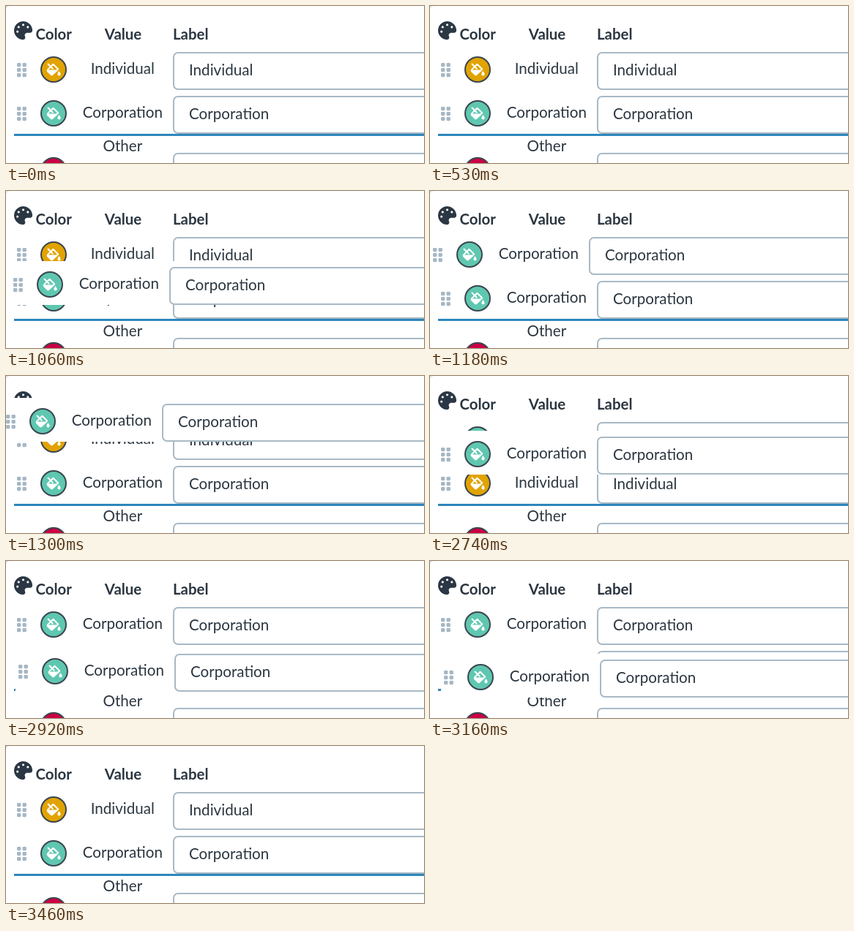
Recreate the animation shown at these times as an HTML page. Size 571x215 px, loop 4460 ms.

```html
<!DOCTYPE html>
<html lang="en">
<head>
<meta charset="utf-8">
<title>Sortable options</title>
<style>
  html, body { margin: 0; width: 100%; height: 100%; overflow: hidden; background: #fff; }
  svg { display: block; width: 571px; height: 215px; }
  text { font: 20.6px Lato, Carlito, sans-serif; fill: #2b3640; }
  .head text { font-weight: 700; font-size: 20.4px; }
  .mid { text-anchor: middle; }
  .grip { fill: #a6b7c4; }
  .box { fill: #fff; stroke: #a8b9c5; stroke-width: 2; }
  .dot { stroke: #3b464f; stroke-width: 2; }
  #individual, #corporation, #ghost { animation: 4460ms step-end infinite; }
  #individual { animation-name: first; }
  #corporation { animation-name: second; }
  #ghost { animation-name: drag; }

  @keyframes first {
    0%, 77.57%, 100% { transform: translateY(0); }
    37.21% { transform: translateY(60px); }
  }
  @keyframes second {
    0%, 77.57%, 100% { transform: translateY(60px); }
    37.21% { transform: translateY(0); }
  }
  /* The dragged copy is parked below the stage when idle. */
  @keyframes drag {
    0%, 35.87%, 76.23%, 100% { transform: translate(0, 300px); }
    21.30% { transform: translate(-1px, 55px); }
    23.76% { transform: translate(-5px, 41px); }
    25.11% { transform: translate(-8px, 20px); }
    26.45% { transform: translate(-11px, 0); }
    27.80% { transform: translate(-13px, -15px); }
    29.14% { transform: translate(-15px, -25px); }
    61.43% { transform: translate(0, 20px); }
    62.78% { transform: translate(0, 34px); }
    64.12% { transform: translate(1px, 50px); }
    65.47% { transform: translate(2px, 64px); }
    66.81% { transform: translate(3px, 75px); }
    68.16% { transform: translate(4px, 82px); }
    69.50% { transform: translate(4px, 78px); }
    70.85% { transform: translate(4px, 72px); }
  }
</style>
</head>
<body>
<svg viewBox="0 0 571 215">
  <defs>
    <g id="grip" class="grip"></g>
    <g id="bucket" fill="none" stroke="#fff" stroke-width="2" stroke-linejoin="round" stroke-linecap="round">
      <path d="M9 1.3 15.7 8 7.8 15.5Q7 16.2 6.2 15.5L1.6 11Q.6 9.8 1.6 8.6Z"/>
      <path d="M1.8 10H13.5L7 15.6Z" fill="#fff"/>
      <path d="M2 1 8.2 7.2"/>
      <path d="M17 10.6Q19.1 13.6 19.1 15A2.1 2.1 0 0 1 14.9 15Q14.9 13.6 17 10.6Z" fill="#fff" stroke="none"/>
    </g>
  </defs>

  <path d="M0 0H6Q0 0 0 6Z" fill="#dfe3e6"/>

  <g class="head">
    <g transform="translate(11 21) scale(.049)">
      <path fill="#2b3744" d="M204 5C105 24 25 104 5 203C-32 390 137 530 264 510C305 504 325 456 306 418C283 373 316 320 367 320H447C483 320 512 290 512 255C511 97 368 -27 204 5Z"/>
      <g fill="#fff">
        <circle cx="96" cy="288" r="32"/><circle cx="128" cy="160" r="32"/>
        <circle cx="256" cy="96" r="32"/><circle cx="384" cy="160" r="32"/>
      </g>
    </g>
    <text x="40.5" y="46">Color</text>
    <text x="160" y="46" class="mid">Value</text>
    <text x="228" y="46">Label</text>
  </g>

  <g id="individual"></g>
  <g id="corporation"></g>

  <rect x="11" y="175" width="580" height="3" fill="#2d86bb"/>
  <text x="159.3" y="199" class="mid">Other</text>
  <circle class="dot" cx="65" cy="225" r="17" fill="#cc0044"/>
  <rect class="box" x="229" y="202" width="420" height="50" rx="6"/>

  <g id="ghost"></g>
</svg>
<script>
  const byId = id => document.getElementById(id);

  byId('grip').innerHTML = [0, 1, 2, 3, 4, 5].map(i =>
    `<rect x="${15 + (i % 2) * 7.5}" y="${78 + (i >> 1) * 7}" width="5.4" height="5.2" rx="1.4"/>`).join('');

  const row = (name, color) => `
    <use href="#grip"/>
    <circle class="dot" cx="65" cy="87" r="17" fill="${color}"/>
    <use href="#bucket" x="55.5" y="78.5"/>
    <text x="159.3" y="92.8" class="mid">${name}</text>
    <rect class="box" x="229" y="64" width="420" height="50" rx="6"/>
    <text x="250" y="94.8">${name}</text>`;

  const teal = row('Corporation', '#5fc7b0');
  byId('individual').innerHTML = row('Individual', '#e1a300');
  byId('corporation').innerHTML = teal;
  byId('ghost').innerHTML = '<rect x="11" y="55" width="640" height="60" fill="#fff"/>' + teal;
</script>
</body>
</html>
```
